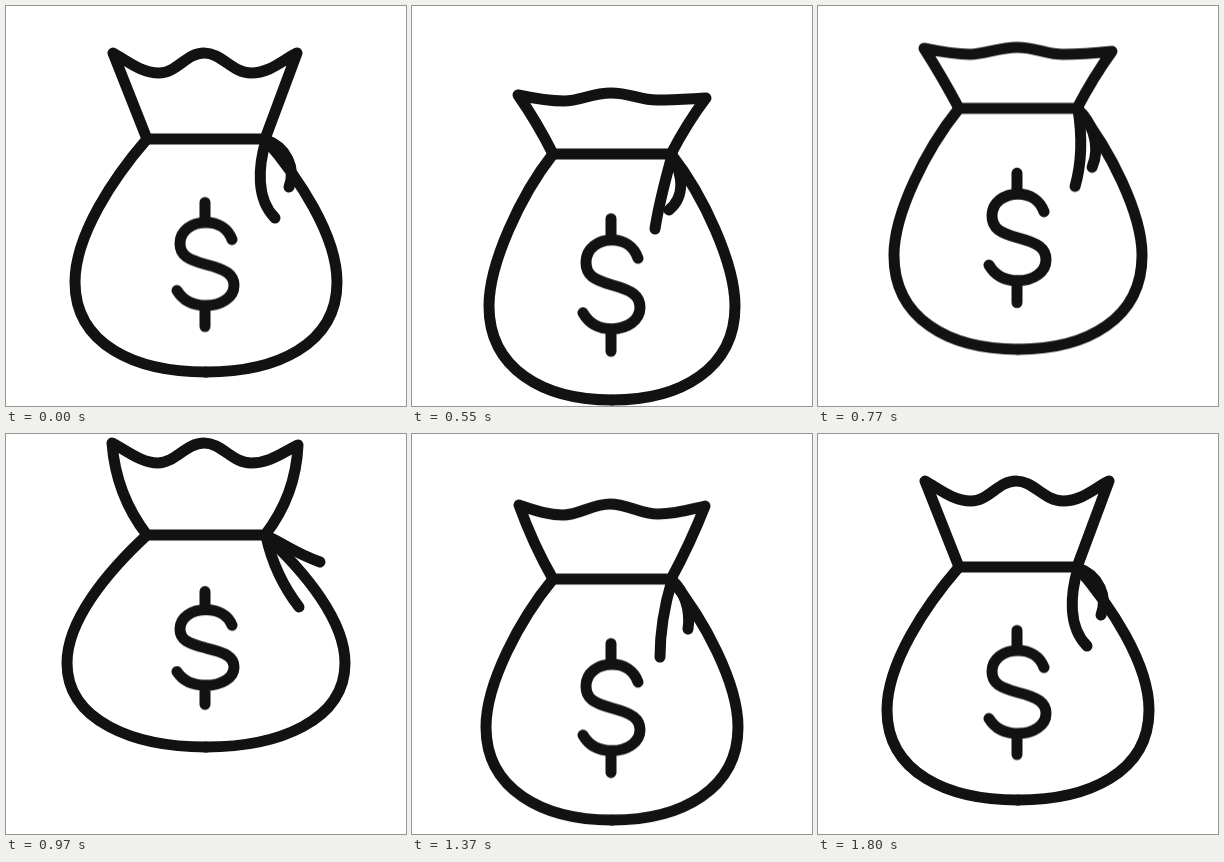
Animation of 400x400 px, one loop 1820 ms. Source, as an HTML page without scripts:

```html
<!DOCTYPE html>
<html lang="en">
<head>
<meta charset="utf-8">
<title>Bouncing money bag</title>
<style>
  html, body { margin: 0; width: 100%; height: 100%; overflow: hidden; background: #fff; }
  svg { display: block; width: 100%; height: 100%; }
  path {
    fill: none; stroke: #121212; stroke-width: 11;
    stroke-linecap: round; stroke-linejoin: round;
    vector-effect: non-scaling-stroke;
  }
  .bag, .neck, .side, .long, .short, .dollar { animation: 1820ms ease-in-out infinite; }
  .bag { animation-name: bounce; }
  .neck { animation-name: neck; }
  .side { animation-name: side; }
  .long { animation-name: long; }
  .short { animation-name: short; }
  .dollar { animation-name: dollar; }

  /* Height of the tie; every shape below is drawn relative to it. */
  @keyframes bounce {
    0%, 17.58%, 98.9%, 100% { transform: translateY(133px); }
    30.22% { transform: translateY(148px); }
    47.8% { transform: translateY(91px); animation-timing-function: cubic-bezier(.35, .1, .65, .9); }
    69.8% { transform: translateY(146px); }
  }
  @keyframes neck {
    0%, 17.58%, 98.9%, 100% { d: path("M141 0Q124-43 107-86C120-79 135-66 153-66S180-86 198-86S226-66 245-66S277-79 291-86Q275-43 259 0Z"); }
    30.22% { d: path("M141 0Q125-32 106-59C125-55 136-53 152-53S180-61 199-61S228-54 245-54S275-55 294-56Q275-31 259 0Z"); }
    42.31% { d: path("M141 0Q124-32 106-60C125-56 136-54 152-54S180-61 199-61S228-54 245-54S275-55 294-57Q275-31 259 0Z"); animation-timing-function: cubic-bezier(.4, .2, .6, 1); }
    53.3% { d: path("M141 0Q110-40 106-92C120-85 135-72 152-72S180-92 198-92S226-72 245-72S277-83 292-90Q290-40 259 0Z"); animation-timing-function: ease-in; }
    64.29% { d: path("M141 0Q113-38 106-86C120-79 135-69 152-69S180-86 197-86S226-70 245-70S277-78 292-85Q286-38 259 0Z"); animation-timing-function: ease-out; }
    75.27% { d: path("M141 0Q121-35 107-74C122-69 135-64 151-64S180-75 198-75S228-65 246-65S276-69 293-73Q278-35 259 0Z"); }
  }
  @keyframes side {
    0%, 17.58%, 98.9%, 100% { d: path("M141 0C108 38 69 96 69 143C69 206 130 233 200 233"); }
    30.22% { d: path("M141 0C108 42 77 110 77 152C77 214 130 246 200 246"); }
    42.31% { d: path("M141 0C108 41 76 105 76 147C76 210 130 241 200 241"); animation-timing-function: cubic-bezier(.4, .2, .6, 1); }
    53.3% { d: path("M141 0C100 38 61 86 61 128C61 186 128 212 200 212"); animation-timing-function: ease-in; }
    64.29% { d: path("M141 0C104 38 65 90 65 134C65 196 130 222 200 222"); animation-timing-function: ease-out; }
    75.27% { d: path("M141 0C108 40 74 104 74 148C74 210 130 241 200 241"); }
  }
  @keyframes long {
    0%, 17.58%, 98.9%, 100% { d: path("M260 1C252 28 250 60 269 79"); }
    30.22% { d: path("M260 1C254 25 247 48 243 75"); }
    42.31% { d: path("M260 1C263 20 265 50 257 78"); animation-timing-function: cubic-bezier(.4, .2, .6, 1); }
    53.3% { d: path("M260 1C266 28 276 50 293 72"); animation-timing-function: ease-in; }
    64.29% { d: path("M260 1C259 28 261 52 272 77"); animation-timing-function: ease-out; }
    75.27% { d: path("M260 1C252 28 248 50 248 78"); }
  }
  @keyframes short {
    0%, 17.58%, 98.9%, 100% { d: path("M260 1C281 8 290 30 283 48"); }
    30.22% { d: path("M260 1C270 20 274 42 257 56"); }
    42.31% { d: path("M260 1C272 12 284 35 274 59"); animation-timing-function: cubic-bezier(.4, .2, .6, 1); }
    53.3% { d: path("M260 1C274 6 286 17 314 27"); animation-timing-function: ease-in; }
    64.29% { d: path("M260 1C271 18 286 33 303 42"); animation-timing-function: ease-out; }
    75.27% { d: path("M260 1C272 12 279 30 276 50"); }
  }
  @keyframes dollar {
    0%, 17.58%, 98.9%, 100% { transform: translateY(125.5px) scaleY(1); }
    30.22% { transform: translateY(131px) scaleY(1.07); }
    42.31% { transform: translateY(129.5px) scaleY(1.045); animation-timing-function: cubic-bezier(.4, .2, .6, 1); }
    53.3% { transform: translateY(113px) scaleY(.91); animation-timing-function: ease-in; }
    64.29% { transform: translateY(119px) scaleY(.96); animation-timing-function: ease-out; }
    75.27% { transform: translateY(129px) scaleY(1.04); }
  }
</style>
</head>
<body>
<svg viewBox="0 0 400 400">
  <g class="bag">
    <path class="neck"/>
    <path class="side"/>
    <g transform="translate(400) scale(-1 1)"><path class="side"/></g>
    <path class="long"/>
    <path class="short"/>
    <path class="dollar" d="M226-25C222-36 212-42 200-42C186-42 174-34 174-21C174-9 182-5 200 0C220 5 228 10 228 21C228 33 215 41 200 41C187 41 177 36 171 26M199-62V-42M199 41V62"/>
  </g>
</svg>
</body>
</html>
```
